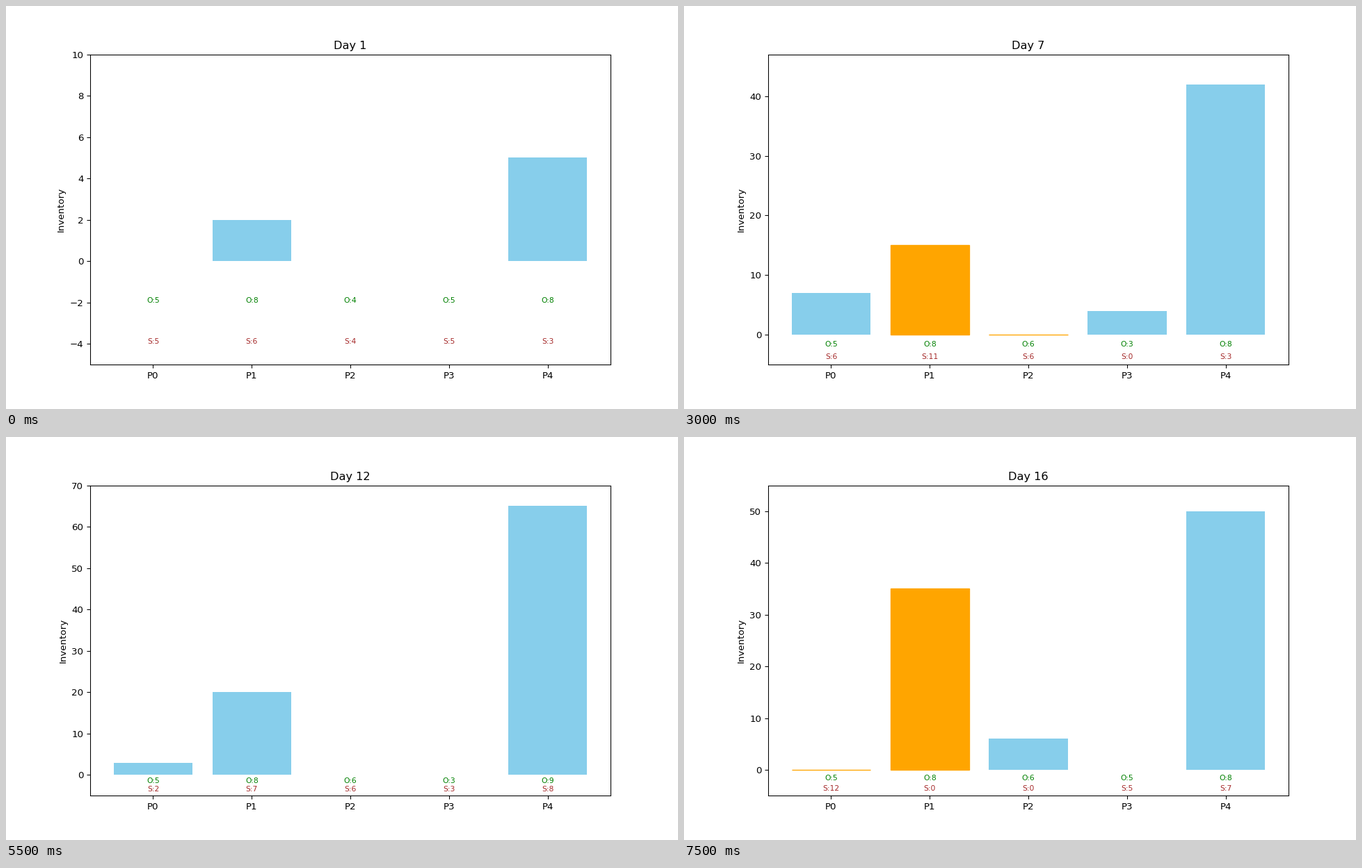
These frames come from a looping animation (966x580 px, 8000 ms). A matplotlib script:

```python
import matplotlib.pyplot as plt
import numpy as np
from matplotlib.animation import FuncAnimation

DAYS = 16
NAMES = [f"P{i}" for i in range(5)]

# Units sold per day, one row per product
SALES = np.array([
    [5, 5, 8, 8, 0, 5, 6, 8, 8, 6, 5, 2, 7, 3, 1, 12],
    [6, 2, 2, 8, 5, 7, 11, 6, 8, 8, 6, 7, 8, 4, 5, 0],
    [4, 2, 2, 4, 4, 6, 6, 6, 5, 2, 6, 6, 5, 6, 7, 0],
    [5, 4, 6, 5, 3, 2, 0, 5, 5, 3, 3, 3, 3, 3, 3, 5],
    [3, 0, 4, 0, 1, 3, 3, 5, 4, 3, 0, 8, 12, 15, 14, 7],
])

# Products highlighted on a given day
SPIKES = {7: (1, 2), 10: (3,), 13: (4,), 14: (4,), 15: (4,), 16: (0, 1)}


def build_orders():
    """Standing orders with their temporary changes."""
    orders = np.repeat([[5], [8], [6], [3], [8]], DAYS, axis=1)
    orders[0, 2:5] = 8
    orders[2, :5] = 4
    orders[2, 2] = 0
    orders[2, 9] = 1
    orders[3, :4] = 5
    orders[3, 15] = 5
    orders[4, 9] = 10
    orders[4, 11:13] = 9
    return orders


ORDERS = build_orders()
STOCK = np.cumsum(ORDERS - SALES, axis=1)

fig, ax = plt.subplots(figsize=(10.0001, 6.0042), dpi=96.6)


def label(x, y, text, color, size=8):
    ax.text(x, y, text, ha="center", color=color, fontsize=size)


def draw(k):
    day = k + 1
    stock = STOCK[:, k]
    ax.clear()
    bars = ax.bar(NAMES, stock, color="skyblue")
    for i in SPIKES.get(day, ()):
        bars[i].set_color("orange")
    for i, (order, sold) in enumerate(zip(ORDERS[:, k], SALES[:, k])):
        label(i, -2, f"O:{order}", "green")
        label(i, -4, f"S:{sold}", "brown")
        if order == 0:
            label(i, 0.5, "X", "red", 16)
    ax.set_ylim(-5, stock.max() + 5)
    ax.set_ylabel("Inventory")
    ax.set_title(f"Day {day}")
    return []


anim = FuncAnimation(fig, draw, frames=DAYS, interval=500,
                     repeat=True, repeat_delay=0)
plt.show()
```
